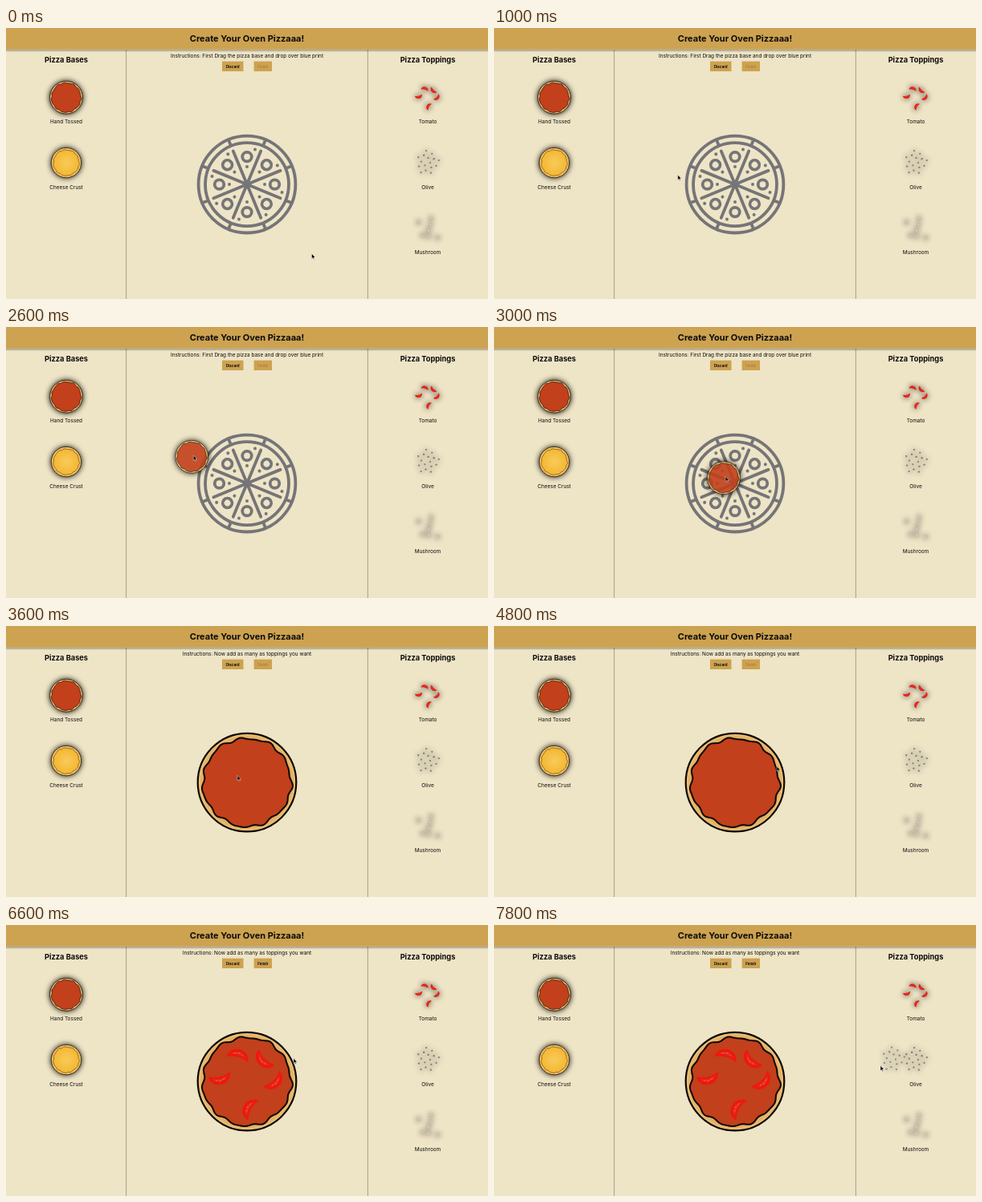
An HTML page for the animation above (8 s loop, 600 by 338 pixels).

```html
<!DOCTYPE html>
<html lang="en">
<head>
<meta charset="utf-8">
<title>Pizza builder</title>
<style>
  html, body { margin: 0; width: 100%; height: 100%; overflow: hidden; background: #eee4c6; }
  svg { display: block; width: 100%; height: 100%; }
  text { font: 6.44px Inter, "Open Sans", sans-serif; text-anchor: middle; fill: #0c0c0c; }
  .title { font-size: 11px; font-weight: 700; }
  .heading { font-size: 9.25px; font-weight: 700; }
  .button { font-size: 4.4px; font-weight: 700; }
  .icon { filter: drop-shadow(0 0 3.8px #000); }
</style>
</head>
<body>
<svg viewBox="0 0 600 338">
  <defs>
    <radialGradient id="crust">
      <stop offset=".86" stop-color="#dda252"/>
      <stop offset="1" stop-color="#edc47d"/>
    </radialGradient>
    <radialGradient id="cheeseFill">
      <stop offset="0" stop-color="#f9cb5a"/>
      <stop offset="1" stop-color="#f3b732"/>
    </radialGradient>
    <linearGradient id="headerShade" x2="0" y2="1">
      <stop stop-color="#000" stop-opacity=".35"/>
      <stop offset="1" stop-color="#000" stop-opacity="0"/>
    </linearGradient>
    <g id="slice">
      <path d="M-14 5C-13-4-7-8 0-8S13-4 14 5Q0-2-14 5Z" fill="#f0170d"/>
      <path d="M-10 1Q0-10 10 1Q0-3-10 1Z" fill="#dc3423"/>
      <path d="M-6-2.2h3M-1-3.5h3M4-2.2h2" stroke="#f0604a"/>
    </g>
    <g id="handTossed"></g>
    <g id="cheese"></g>
    <g id="tomato"></g>
    <g id="olive" fill="#7d7b76"></g>
    <g id="mushroom" fill="#d6cfbd" stroke="#aaa393"></g>
  </defs>

  <rect width="600" height="338" fill="#eee4c6"/>
  <path d="M149.6 27V338M450.4 27V338" stroke="#96907f" stroke-width=".8"/>
  <rect y="26.7" width="600" height="3.6" fill="url(#headerShade)"/>
  <rect width="600" height="26.7" fill="#cda250"/>
  <text class="title" x="300" y="17.3">Create Your Oven Pizzaaa!</text>
  <text class="heading" x="75" y="43.4">Pizza Bases</text>
  <text class="heading" x="525" y="43.4">Pizza Toppings</text>
  <text id="hint" x="300" y="36.7"></text>
  <rect x="269" y="41.6" width="26.5" height="12.4" fill="#cda250"/>
  <rect x="308.6" y="41.6" width="22.4" height="12.4" fill="#cda250"/>
  <text class="button" x="282.2" y="49.5">Discard</text>
  <text class="button" id="finish" x="319.8" y="49.5">Finish</text>

  <g id="shelf"></g>
  <g transform="translate(300 195.1)">
    <g id="blueprint" fill="none" stroke="#757578" stroke-width="3.8" stroke-linecap="round"></g>
    <use id="placedBase" href="#handTossed"/>
    <use id="placedTomato" href="#tomato"/>
  </g>
  <g id="ghosts"></g>

  <g id="cursor">
    <path id="arrow" d="M0 0V6.2L1.4 4.9L2.4 7.1L3.4 6.7L2.5 4.6H4.5Z" fill="#000" stroke="#fff" stroke-width=".45"/>
    <path id="hand" d="M0 1Q0-.7.9-.4Q1.6-1.2 2.3-.3Q3.4-.5 3.5.7Q4.3.8 4 2L3.3 4.5H.9L-1.2 2.1Q-.8 1.3 0 2Z" fill="#fff" stroke="#000" stroke-width=".5"/>
  </g>
</svg>
<script>
const $ = id => document.getElementById(id);
const add = (id, markup) => $(id).insertAdjacentHTML('beforeend', markup);
const polar = (r, angle) => [r * Math.cos(angle), r * Math.sin(angle)];

// Round base with a wavy filling
function pizza(id, crust, fill, ink, radius) {
  const edge = Array.from({ length: 180 }, (_, i) => {
    const a = i * Math.PI / 90;
    return polar(radius + 1.2 * Math.sin(11 * a + 1) + .8 * Math.sin(17 * a) + .6 * Math.sin(5 * a), a);
  });
  add(id, `<circle r="61.3" fill="${crust}" stroke="#0b0704" stroke-width="2.2"/>
    <polygon points="${edge}" fill="${fill}" stroke="${ink}" stroke-width="2"/>`);
}
pizza('handTossed', 'url(#crust)', '#c2401c', '#0b0704', 55);
pizza('cheese', '#f0bf62', 'url(#cheeseFill)', '#5c340a', 52.5);

// Slices on a ring: position angle, own rotation
for (const [angle, turn] of [[-109, 15], [-52, 225], [0, 135], [84, -61], [187, 167]])
  add('tomato', `<use href="#slice" transform="translate(${polar(34, angle * Math.PI / 180)}) rotate(${turn})"/>`);

for (let i = 0; i < 16; i++) {
  const [x, y] = polar(11.5 * Math.sqrt(i + .6), i * 2.4);
  add('olive', `<circle cx="${x}" cy="${y}" r="3.5"/><circle cx="${x}" cy="${y}" r="1.1" fill="#aaa497"/>`);
}

[[-34, -21], [12, -36], [9, -12], [2, 8], [-20, 27], [4, 30], [37, 36]].forEach((place, i) =>
  add('mushroom', `<path d="M-6 1Q-5-6 0-6T6 1L2 2V6H-2V2Z" transform="translate(${place}) rotate(${i * 50 - 30})"/>`));

add('blueprint', '<circle r="60.4"/><circle r="52"/>');
for (let turn = 0; turn < 360; turn += 45)
  add('blueprint', `<g transform="rotate(${turn})">
    <path d="M0 0V-45M0-53V-60" transform="rotate(22.5)"/>
    <circle cy="-34.5" r="5.8"/>
    <g fill="#757578" stroke="none"><circle cy="-22" r="2"/><circle cx="10" cy="-43.5" r="2"/></g></g>`);

const items = {};
const icon = ({ name, x, y, scale }) =>
  `<g transform="translate(${x} ${y})"><g class="icon"><use href="#${name}" transform="scale(${scale})"/></g></g>`;
function stock(x, entries) {
  entries.forEach(([name, label, scale = .333], row) => {
    const y = 86.7 + 81.4 * row;
    items[name] = { name, x, y, scale };
    add('shelf', `${icon(items[name])}<text x="${x}" y="${y + 32.6}">${label}</text>`);
  });
}
stock(75, [['handTossed', 'Hand Tossed'], ['cheese', 'Cheese Crust', .305]]);
stock(525, [['tomato', 'Tomato'], ['olive', 'Olive'], ['mushroom', 'Mushroom']]);

// Pointer moves; a dragged item is dropped shortly after arriving
const DROP_DELAY = 400;
const home = [380.5, 281.5];
const moves = [
  { from: 400, to: 1600, at: [77, 85] },
  { from: 2200, to: 2800, at: [288, 186.5], drag: 'handTossed' },
  { from: 4000, to: 4800, at: [352, 175] },
  { from: 4800, to: 5200, at: [522, 86] },
  { from: 5400, to: 6000, at: [330, 164.5], drag: 'tomato' },
  { from: 6400, to: 7200, at: [509, 176] },
  { from: 7400, to: 7800, at: [481, 175.5], drag: 'olive' }
];
const drags = moves.filter(move => move.drag);
for (const { drag } of drags) add('ghosts', `<g id="drag-${drag}" opacity=".9">${icon(items[drag])}</g>`);

const startOf = move => moves[moves.indexOf(move) - 1]?.at ?? home;
function pointerAt(t) {
  const move = moves.findLast(m => m.from <= t) ?? moves[0];
  const u = Math.min(1, Math.max(0, (t - move.from) / (move.to - move.from)));
  const ease = u * u * (3 - 2 * u);
  return startOf(move).map((v, axis) => v + (move.at[axis] - v) * ease);
}

const show = (id, visible) => $(id).setAttribute('visibility', visible ? 'visible' : 'hidden');
const place = (id, x, y) => $(id).setAttribute('transform', `translate(${x} ${y})`);
const dropped = (name, t) => t >= moves.find(move => move.drag === name).to + DROP_DELAY;
const start = performance.now();

function draw(now) {
  const t = Math.floor(Math.max(0, now - start) % 8000 / 200) * 200;
  const [x, y] = pointerAt(t);
  const hasBase = dropped('handTossed', t), hasTomato = dropped('tomato', t);
  show('blueprint', !hasBase);
  show('placedBase', hasBase);
  show('placedTomato', hasTomato);
  $('hint').textContent = hasBase
    ? 'Instructions: Now add as many as toppings you want'
    : 'Instructions: First Drag the pizza base and drop over blue print';
  $('finish').style.fill = hasTomato ? '#0c0c0c' : '#b4803c';

  for (const move of drags) {
    const [x0, y0] = startOf(move);
    show('drag-' + move.drag, t >= move.from && !dropped(move.drag, t));
    place('drag-' + move.drag, x - x0, y - y0);
  }
  const hovering = moves.some((move, i) => moves[i + 1]?.drag && t >= move.to && t < moves[i + 1].from);
  show('hand', hovering);
  show('arrow', !hovering);
  place('cursor', x, y);
  requestAnimationFrame(draw);
}
draw(start);
</script>
</body>
</html>
```
